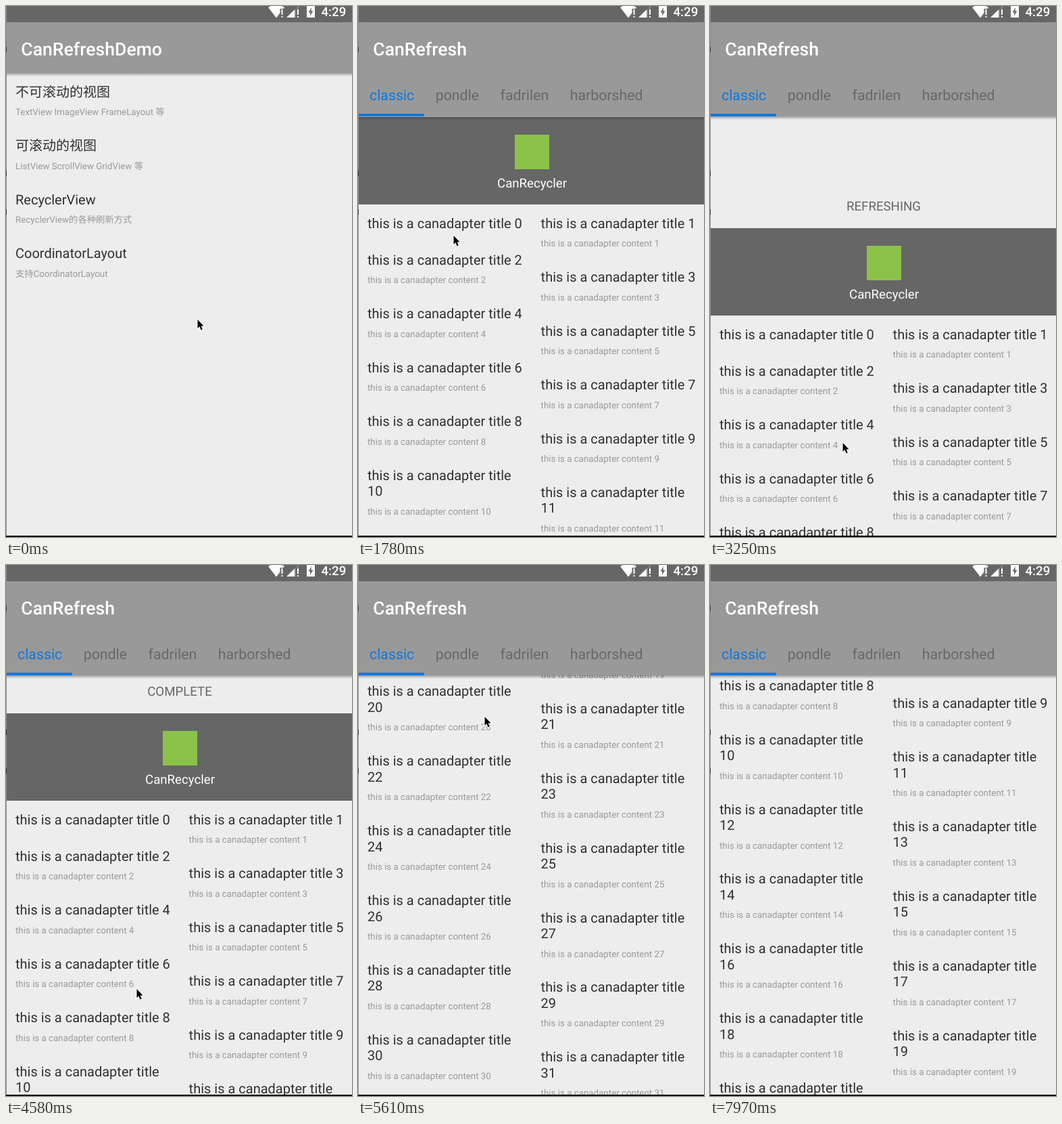
An HTML page with a canvas for the animation above (8 s loop, 512 px wide and 784 px high).

```html
<!DOCTYPE html>
<html lang="zh">
<head>
<meta charset="utf-8">
<title>CanRefreshDemo</title>
<style>
html, body { margin: 0; height: 100%; overflow: hidden; background: #ededed; }
canvas { display: block; }
</style>
</head>
<body>
<canvas id="stage" width="512" height="784"></canvas>
<script>
const ctx = document.getElementById('stage').getContext('2d');
ctx.textRendering = 'geometricPrecision';

const LOOP = 8000, TICK = 147.5;   // the screen refreshes once per tick
const FONT = 'Roboto, "Noto Sans CJK SC", "Noto Sans CJK", sans-serif';
const BAR = 163, LIST_TOP = 293, BATCH = 50;
const TITLE = 20, NOTE = 13.33, LINE = TITLE * 1.172, ROW = 79.45;
const LEFT = 14, RIGHT = 270.6;

// Pointer stops: tick, x, y
const STOPS = [[0, 283, 463], [6, 105, 294], [8, 105, 294], [12, 141, 339], [22, 196, 645],
  [31, 193, 626], [38, 187, 224], [40, 196, 590], [44, 197, 290], [47, 200, 600],
  [49, 200, 600], [54, 205, -40]];

// Eased progress from 0 to 1 between two ticks
function ease(tick, from, to) {
  const p = Math.min(1, Math.max(0, (tick - from) / (to - from)));
  return p * p * (3 - 2 * p);
}

// Three swipes up; the second one ends at the loader
function scrollAt(tick) {
  return 1273 * ease(tick, 33, 40) + 760 * ease(tick, 40, 44) + 857 * ease(tick, 49, 54);
}

// Drag down, spring back to the resting height, collapse
function pullAt(tick) {
  const rest = 74, drag = 107;
  return rest * (ease(tick, 15, 21) - ease(tick, 30, 33)) +
    drag * (ease(tick, 15, 21) - ease(tick, 21, 25));
}

function pullLabel(tick, pull) {
  if (tick >= 30) return 'COMPLETE';
  if (tick >= 22) return 'REFRESHING';
  return pull < 67 ? 'PULL TO REFRESH' : 'RELEASE TO REFRESH';
}

function rect(x, y, w, h, color) {
  ctx.fillStyle = color;
  ctx.fillRect(x, y, w, h);
}

function text(str, x, y, size, color, weight = 400, align = 'left') {
  ctx.font = `${weight} ${size}px ${FONT}`;
  ctx.textAlign = align;
  ctx.fillStyle = color;
  ctx.fillText(str, x, y);
}

function shape(path, color) {
  ctx.fillStyle = color;
  ctx.fill(new Path2D(path));
}

function toolbar(title, bottom) {
  const shade = ctx.createLinearGradient(0, bottom, 0, bottom + 5);
  shade.addColorStop(0, 'rgba(0,0,0,.32)');
  shade.addColorStop(1, 'rgba(0,0,0,0)');
  rect(0, bottom, 512, 5, shade);
  rect(0, 24, 512, bottom - 24, '#999');
  text(title, 22.3, 73, 26.6, '#fff', 500);
}

function row(x, y, lines, note) {
  lines.forEach((line, i) => text(line, x, y + 34.8 + i * LINE, TITLE, '#303030'));
  if (note) text(note, x, y + 38.9 + lines.length * LINE, NOTE, '#999');
}

function menu() {
  rect(0, 0, 512, 784, '#ededed');
  [['不可滚动的视图', 'TextView ImageView FrameLayout 等'],
   ['可滚动的视图', 'ListView ScrollView GridView 等'],
   ['RecyclerView', 'RecyclerView的各种刷新方式'],
   ['CoordinatorLayout', '支持CoordinatorLayout']
  ].forEach(([title, note], i) => row(LEFT, 99 + i * ROW, [title], note));
  toolbar('CanRefreshDemo', 99);
}

// Two staggered columns; returns the bottom of the longer one
function items(top, count) {
  const y = [top, top];
  for (let n = 0; n < count; n++) {
    const col = n % 2, num = n % BATCH, wraps = num > 9;
    const title = 'this is a canadapter title';
    if (y[col] > 40 && y[col] < 784) {
      row(col ? RIGHT : LEFT, y[col], wraps ? [title, `${num}`] : [`${title} ${num}`],
        n && `this is a canadapter content ${num}`);
    }
    y[col] += n === 0 ? 54 : wraps ? ROW + LINE : ROW;
  }
  return Math.max(...y);
}

function loader(y, turn) {
  ctx.beginPath();
  ctx.arc(257.5, y, 10.5, turn + 0.65, turn + 5.2);
  ctx.lineWidth = 2.6;
  ctx.strokeStyle = '#484848';
  ctx.stroke();
}

function tabs() {
  let x = 17;
  ['classic', 'pondle', 'fadrilen', 'harborshed'].forEach((name, i) => {
    text(name, x, 139.3, 21.3, i ? '#686868' : '#0f78dd');
    x += ctx.measureText(name).width + 31.5;
  });
  rect(0, 159, 98, 4, '#0f78dd');
}

function listPage(tick) {
  const pull = Math.round(pullAt(tick)), shift = pull - scrollAt(tick);
  const loaded = tick >= 47;
  rect(0, 0, 512, 784, '#ededed');
  if (pull) text(pullLabel(tick, pull), 257, BAR + pull - 25.5, 18.67, '#666', 400, 'center');

  rect(0, BAR + 1 + shift, 512, 129, '#666');
  rect(232, 190 + shift, 51, 51, '#8bc34a');
  text('CanRecycler', 257.5, 267.7 + shift, 18.67, '#fff', 400, 'center');

  const end = items(LIST_TOP + shift, loaded ? 2 * BATCH : BATCH);
  if (!loaded) loader(end + 33, (tick - 44) * 0.9);

  toolbar('CanRefresh', BAR);
  tabs();
}

function statusBar() {
  rect(0, 0, 512, 24, '#666');
  shape('M388 2L392 0H408L412 2L400 17.5Z', '#fff');
  shape('M433 0V17H415Z', '#8c8c8c');
  shape('M427 5.5V17H415Z', '#fff');
  for (const x of [407.5, 431]) {
    rect(x - 2, 4, 6, 14, '#666');
    rect(x, 5, 2, 8, '#fff');
    rect(x, 15, 2, 2, '#fff');
  }
  rect(445, 0, 12, 17, '#fff');
  shape('M452 2L447.5 9.5H450.5L450 15L454.5 7.5H451.5Z', '#666');
  text('4:29', 466.5, 15, 18.67, '#fff', 500);
}

function edges() {
  rect(0, 0, 1, 784, '#8e8e8e');
  for (const y of [60, 243, 300]) rect(0, y, 1, 8, '#333');
  rect(0, 782, 512, 2, '#000');
}

function pointer(tick) {
  const i = Math.max(1, STOPS.findIndex(stop => stop[0] >= tick));
  const [t0, x0, y0] = STOPS[i - 1], [t1, x1, y1] = STOPS[i];
  const p = ease(tick, t0, t1);
  ctx.save();
  ctx.translate(x0 + (x1 - x0) * p, y0 + (y1 - y0) * p);
  const arrow = 'M.5 0V13L3.4 10.3L5.6 15.5L7.8 14.6L5.6 9.5H9.6Z';
  ctx.lineWidth = 2;
  ctx.strokeStyle = '#fff';
  ctx.stroke(new Path2D(arrow));
  shape(arrow, '#000');
  ctx.restore();
}

function draw(ms) {
  const tick = Math.min(54, Math.floor(ms % LOOP / TICK));
  const enter = Math.min(1, Math.max(0, (tick - 7) / 3));
  if (enter < 1) menu();
  if (enter > 0) {
    ctx.save();
    ctx.globalAlpha = enter;
    ctx.translate(0, 62 * (1 - enter) ** 2);
    listPage(tick);
    ctx.restore();
  }
  statusBar();
  edges();
  pointer(tick);
}

const start = performance.now();
function loop() {
  draw(performance.now() - start);
  requestAnimationFrame(loop);
}
loop();
</script>
</body>
</html>
```
